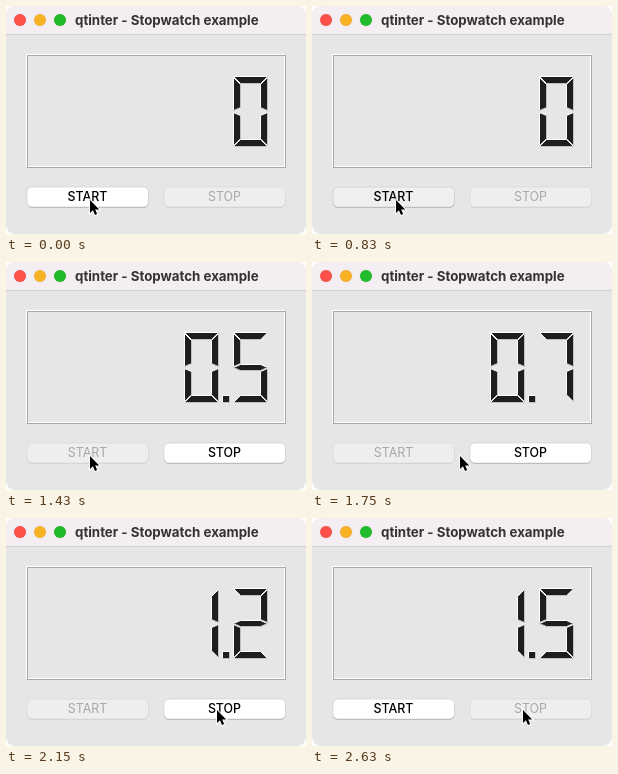
Recreate the animation shown at these times as an HTML page. Size 300 px wide and 228 px high, loop 3170 ms.

```html
<!DOCTYPE html>
<html lang="en">
<head>
<meta charset="utf-8">
<title>Stopwatch</title>
<style>
  html, body { margin: 0; width: 100%; height: 100%; overflow: hidden; background: #fff; }
  svg { display: block; width: 300px; height: 228px; border-radius: 9px; background: #e6e6e6; }
  text { font-family: Inter, "Liberation Sans", sans-serif; font-size: 12.4px; font-weight: 500; text-anchor: middle; }
  .title { font-size: 13.3px; font-weight: 700; text-anchor: start; fill: #343234; }
  .light { stroke: #000; stroke-opacity: .1; stroke-width: .6; }
  .line { fill: none; stroke-width: 1; }
  .button rect { fill: #fff; stroke: #c9c9c9; stroke-width: .6; }
  .button .shade { fill: #b8b8b8; stroke: none; }
  .pressed .face { fill: #efefef; }
  .disabled .face { fill: #eee; stroke: #d4d4d4; }
  .disabled .shade { fill: #d6d6d6; }
  .disabled text { fill: #a8a8a8; font-weight: 400; }
</style>
</head>
<body>
<svg viewBox="0 0 300 228">
  <rect width="300" height="28" fill="#f4eef2"/>
  <rect y="28" width="300" height="1" fill="#d3d0d2"/>
  <circle class="light" cx="14" cy="14" r="6" fill="#fe5048"/>
  <circle class="light" cx="34" cy="14" r="6" fill="#f9b126"/>
  <circle class="light" cx="54" cy="14" r="6" fill="#20bb28"/>
  <text class="title" x="69" y="18.5">qtinter - Stopwatch example</text>
  <rect class="line" x="20.5" y="48.5" width="258" height="112" stroke="#fff"/>
  <rect class="line" x="21.5" y="49.5" width="258" height="112" stroke="#a9a9a9"/>
  <g id="lcd" transform="translate(227.5 70.5)"></g>
  <g id="start" class="button" transform="translate(21 181)">
    <rect class="shade" y="1" width="121.5" height="20" rx="5"/>
    <rect class="face" width="121.5" height="20" rx="5"/>
    <text x="60.5" y="14">START</text>
  </g>
  <g id="stop" class="button" transform="translate(158 181)">
    <rect class="shade" y="1" width="121.5" height="20" rx="5"/>
    <rect class="face" width="121.5" height="20" rx="5"/>
    <text x="60.5" y="14">STOP</text>
  </g>
  <g id="cursor">
    <path transform="translate(0 1) scale(.94)" d="M0 0V13.8L3.1 10.9L5.3 16L7.6 15L5.5 10.1H9.8Z" stroke="#fff" stroke-width="1.8" paint-order="stroke"/>
  </g>
</svg>
<script>
const LOOP = 3170, PRESS = 830, STARTED = 980, STOP_PRESS = 2430, STOPPED = 2550;
// Key points: time, then values
const COUNT = [[930, 0], [1430, 5], [1760, 7.9], [1950, 10], [2450, 15]];
const POINTER = [[1440, 84, 193], [1950, 189, 193], [2110, 211, 191]];

const LEN = 35, WIDTH = 7, RIGHT = LEN - 1, INNER = RIGHT - WIDTH, STEP = LEN + 2 * WIDTH;
const TONES = { l: "#fff", d: "#c2c2c2" };
const DIGITS = ["abcdef", "bc", "abged", "abgcd", "fgbc", "afgcd", "afgecd", "abc", "abcdefg", "abcdfg"];

// Each segment is its corners and the light or dark tone of each edge
const bar = (y, dy, tones) => [[[0, y], [RIGHT, y], [INNER, y + dy], [WIDTH, y + dy]], tones];
const side = (x, inner, y, gap, tones) =>
  [[[x, y], [x, y + LEN - 2], [inner, y + gap + 23], [inner, y + gap]], tones];
const SEGMENTS = {
  a: bar(0, WIDTH, "lddl"),
  b: side(RIGHT, INNER, 1, WIDTH, "ddll"),
  c: side(RIGHT, INNER, LEN + 1, 3, "ddll"),
  d: bar(2 * LEN, -WIDTH, "dlll"),
  e: side(0, WIDTH, LEN + 1, 3, "lddl"),
  f: side(0, WIDTH, 1, WIDTH, "lddl"),
  g: [[[0, LEN], [WIDTH, LEN - 3], [INNER, LEN - 3], [RIGHT, LEN], [INNER, LEN + 3], [WIDTH, LEN + 3]], "lllddd"],
  ".": [[[38, 70], [45, 70], [45, 63], [38, 63]], "ddll"]
};

const find = id => document.getElementById(id);
let shown;

function segment(name) {
  const [corners, tones] = SEGMENTS[name];
  const edges = corners.map((p, i) =>
    `<path d="M${p}L${corners[(i + 1) % corners.length]}" stroke="${TONES[tones[i]]}"/>`);
  return `<polygon points="${corners.join(" ")}" fill="#1e1e1e"/>` + edges.join("");
}

function showNumber(text) {
  if (text === shown) return;
  shown = text;
  const parts = text.split(".");
  find("lcd").innerHTML = parts.map((digit, i) => {
    const last = i === parts.length - 1;
    const names = DIGITS[digit] + (last ? "" : ".");
    return `<g transform="translate(${last ? 0 : -STEP})">${[...names].map(segment).join("")}</g>`;
  }).join("");
}

function valuesAt(keys, t) {
  const next = keys.findIndex(key => key[0] > t);
  const to = keys.at(next), from = next > 0 ? keys[next - 1] : to;
  const k = to === from ? 0 : (t - from[0]) / (to[0] - from[0]);
  return from.slice(1).map((v, i) => v + (to[i + 1] - v) * k);
}

function setButton(id, disabled, pressed) {
  find(id).setAttribute("class", "button" + (disabled ? " disabled" : pressed ? " pressed" : ""));
}

function draw(t) {
  const running = t >= STARTED && t < STOPPED;
  showNumber(t < STARTED ? "0" : (Math.floor(valuesAt(COUNT, t)[0]) / 10).toFixed(1));
  setButton("start", running, t >= PRESS && t < STARTED);
  setButton("stop", !running, t >= STOP_PRESS);
  find("cursor").setAttribute("transform", `translate(${valuesAt(POINTER, t)})`);
}

const begin = performance.now();
function frame() {
  draw((performance.now() - begin) % LOOP);
  requestAnimationFrame(frame);
}
frame();
</script>
</body>
</html>
```
